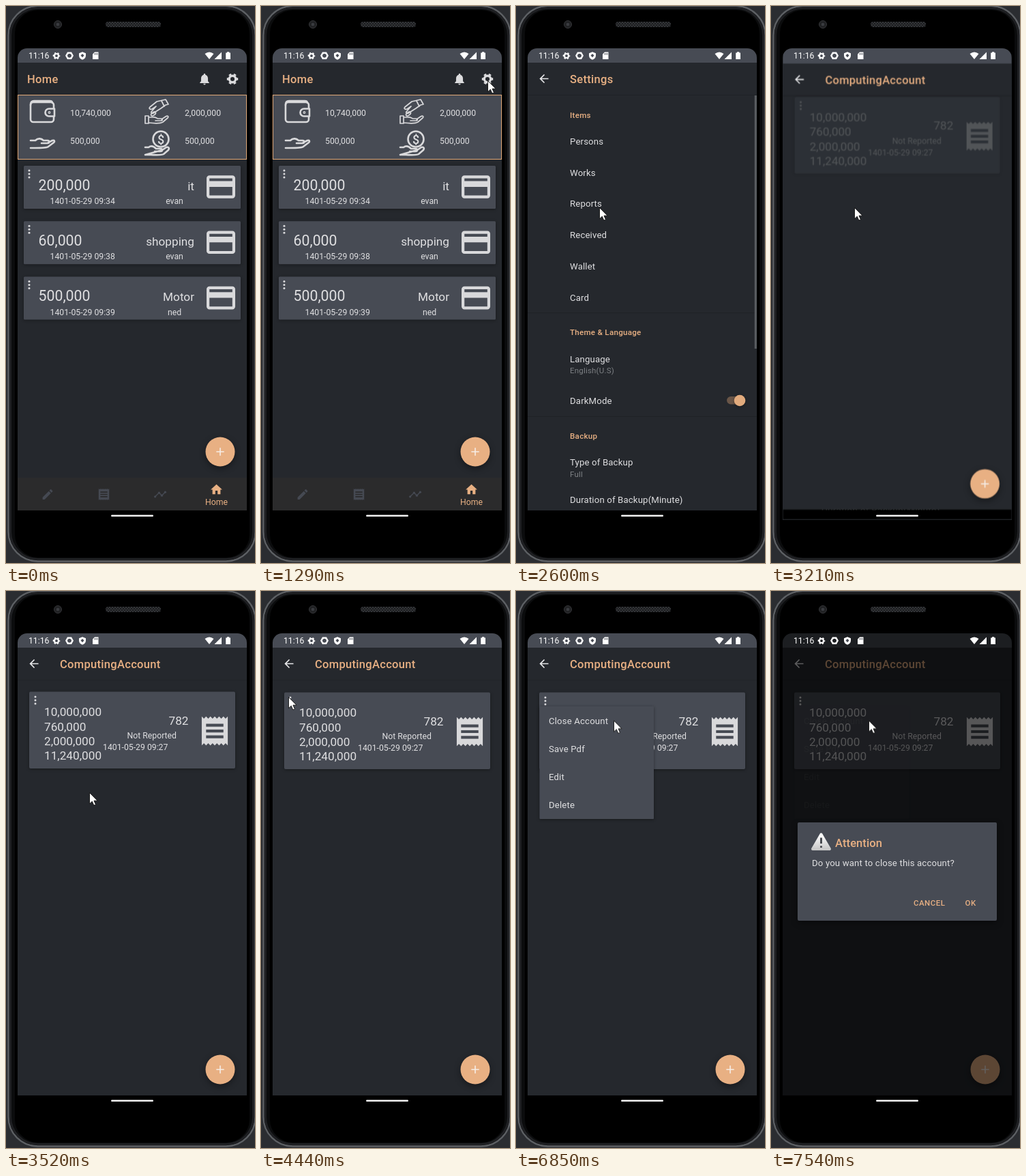
Recreate the animation shown at these times as an HTML page. Size 365 by 816 pixels, loop 8000 ms.

```html
<!DOCTYPE html>
<html lang="en">
<head>
<meta charset="utf-8">
<title>Account app walkthrough</title>
<style>
html, body { margin: 0; width: 100%; height: 100%; overflow: hidden; background: #2b2d31; }
svg { display: block; }
#stage { width: 365px; height: 816px; }
text { font-family: Roboto, "Noto Sans", sans-serif; fill: #dfdfe1; font-size: 12.26px; white-space: pre; }
.title { font-size: 16.5px; font-weight: 500; fill: #e8b083; letter-spacing: .3px; }
#dialog .title { letter-spacing: .1px; }
.head { font-size: 11.6px; font-weight: 500; fill: #e8b083; letter-spacing: .27px; }
.item { font-size: 13.2px; letter-spacing: .15px; }
.note { font-size: 11.5px; fill: #7d8084; letter-spacing: .2px; }
.sum { font-size: 21.3px; }
.mid { font-size: 17.2px; }
.btn { font-size: 11.44px; font-weight: 500; fill: #e8b083; letter-spacing: .5px; }
.end { text-anchor: end; }
.center { text-anchor: middle; }
.panel { fill: #474b54; filter: drop-shadow(0 1.5px 2px rgba(0,0,0,.38)); }
.high { filter: drop-shadow(0 3px 5px rgba(0,0,0,.4)); }
.line { fill: none; stroke: #d9d9db; stroke-width: 2.6; stroke-linecap: round; stroke-linejoin: round; }
.thin { stroke-width: 1.7; }
#home, #settings, #account, #dialog { transform-origin: 185px 407.5px; }
</style>
</head>
<body>
<svg id="stage" viewBox="0 0 365 816">
  <defs>
    <clipPath id="screen"><path d="M17 753V76a14 14 0 0 1 14-14H339a14 14 0 0 1 14 14V753z"/></clipPath>
    <pattern id="mesh" width="4" height="4" patternUnits="userSpaceOnUse">
      <path d="M0 0l4 4M4 0L0 4" stroke="#36383b" stroke-width=".9"/>
    </pattern>
    <linearGradient id="tin" x2="0" y2="1">
      <stop offset="0" stop-color="#fff"/><stop offset="1" stop-color="#c9c9c9"/>
    </linearGradient>
    <g id="gear">
      <circle r="5.6" fill="none" stroke="currentColor" stroke-width="4"/>
      <circle r="8.4" fill="none" stroke="currentColor" stroke-width="2.8" pathLength="12" stroke-dasharray="1" stroke-dashoffset=".5"/>
    </g>
    <g id="dots" fill="#dcdcde"><circle cy="-5" r="1.5"/><circle r="1.5"/><circle cy="5" r="1.5"/></g>
    <path id="arrow" transform="scale(.82) translate(-12 -12)" fill="#e8e8ea" d="M20 11H7.83l5.59-5.59L12 4l-8 8 8 8 1.41-1.41L7.83 13H20z"/>
    <path id="receipt" transform="translate(-12 -12)" d="M18 17H6v-2h12zm0-4H6v-2h12zm0-4H6V7h12zM3 22l1.5-1.5L6 22l1.5-1.5L9 22l1.5-1.5L12 22l1.5-1.5L15 22l1.5-1.5L18 22l1.5-1.5L21 22V2l-1.5 1.5L18 2l-1.5 1.5L15 2l-1.5 1.5L12 2l-1.5 1.5L9 2 7.5 3.5 6 2 4.5 3.5 3 2z"/>
    <path id="bank" transform="translate(-12 -12)" fill="#d9d9db" d="M20 4H4a2 2 0 0 0-2 2v12a2 2 0 0 0 2 2h16a2 2 0 0 0 2-2V6a2 2 0 0 0-2-2zm0 14H4v-6h16zm0-10H4V6h16z"/>
    <g id="fab">
      <circle class="high" r="21.5" fill="#e8b083"/>
      <path d="M-5.7 0H5.7M0-5.7V5.7" stroke="#f6ede6" stroke-width="1.6"/>
    </g>
    <g id="window">
      <path fill="#25282d" d="M17 62h336v677H17z"/>
      <path fill="#474b54" d="M17 62h336v21H17z"/>
      <path d="M17 739h336v14H17z"/>
    </g>
  </defs>

  <rect width="365" height="816" fill="#2b2d31"/>
  <rect x="3.5" y="0" width="362" height="813.5" rx="43" fill="#0b0c0d" stroke="#5d6064" stroke-width="2.4"/>
  <rect x="6.5" y="3" width="356" height="807.5" rx="40" fill="none" stroke="#1f2023" stroke-width="3"/>
  <rect x="13" y="6" width="344" height="802" rx="34"/>
  <circle cx="76" cy="27" r="5.5" fill="#202123" stroke="#343538"/>
  <circle cx="76" cy="27" r="2.3" fill="#3a3c40"/>
  <rect x="146" y="23" width="81" height="8" rx="4" fill="#1b1c1e"/>
  <rect x="146" y="23" width="81" height="8" rx="4" fill="url(#mesh)"/>

  <g clip-path="url(#screen)">
    <rect x="17" y="62" width="336" height="691"/>
    <g id="home">
      <use href="#window"/>
      <text class="title" x="31" y="113">Home</text>
      <path transform="translate(291 107) scale(.84) translate(-12 -12)" fill="#dcdcde" d="M12 22a2 2 0 0 0 2-2h-4a2 2 0 0 0 2 2zm6-6v-5c0-3-1.6-5.6-4.5-6.3V4a1.5 1.5 0 0 0-3 0v.7C7.6 5.4 6 8 6 11v5l-2 2v1h16v-1z"/>
      <use href="#gear" color="#dcdcde" transform="translate(332 107) scale(.84)"/>
      <rect x="17.5" y="130.5" width="335" height="94" fill="#474b54" stroke="#e0a878"/>
      <g class="line">
        <rect x="36" y="141" width="34" height="29" rx="4"/>
        <path d="M36 145c0-5 2-6 5-6h23c3 0 4 1 4 3"/>
        <path d="M71 150.5H63a5 5 0 0 0 0 11h8z" fill="#474b54"/>
        <circle cx="63.5" cy="156" r=".6"/>
        <path d="M36 197h7c4-4 9-3 12 0h6c3 0 3 4 0 4h-9M62 200l6-3c3-1 4 1 2 3l-8 6c-2 2-18 2-20 2h-6"/>
      </g>
      <g class="line thin">
        <path d="M234 137l-13 3-10 8c-2 2 0 4 3 3l6-4-7 8c-1 2 1 3 3 2l11-7 7-5 4-1zM228 139l4 8"/>
        <path d="M204 161h5v11h-5zM209 163h6c4-1 5 1 8 2h4c3 0 3 3 0 3h-8M228 166l6-4c3-2 5 0 3 2l-7 6c-3 2-13 2-21 1"/>
        <ellipse cx="216" cy="158" rx="4" ry="2.2" transform="rotate(-40 216 158)"/>
      </g>
      <g class="line">
        <circle cx="227" cy="195" r="11.5"/>
        <path d="M204 207h5c4-3 8-1 11 2h6c4 0 4 4 0 4h-8M229 211l6-4c3-1 5 1 3 4l-7 6c-3 2-14 1-19 1h-8z"/>
      </g>
      <text class="center" x="227" y="201.5" style="font-size:18px;font-weight:500">$</text>
      <text x="94" y="161">10,740,000</text><text x="262" y="161">2,000,000</text>
      <text x="94" y="202">500,000</text><text x="262" y="202">500,000</text>
      <g id="cards"></g>
      <use href="#fab" x="314" y="653"/>
      <path fill="#2b2b2c" d="M17 691h336v48H17z"/>
      <g fill="#454952">
        <path transform="translate(61 715.5) scale(.82) translate(-12 -12)" d="M3 17.25V21h3.75L17.8 9.9l-3.7-3.7zM20.7 7a1 1 0 0 0 0-1.4l-2.3-2.3a1 1 0 0 0-1.4 0l-1.9 1.8 3.75 3.75z"/>
        <use href="#receipt" transform="translate(143.5 715.5) scale(.86)"/>
        <g transform="translate(226 715.5) scale(.82) translate(-12 -12)">
          <path d="M3 16l7-7 5 5 6-6" fill="none" stroke="#454952" stroke-width="1.8"/>
          <circle cx="3" cy="16" r="2"/><circle cx="10" cy="9" r="2"/><circle cx="15" cy="14" r="2"/><circle cx="21" cy="8" r="2"/>
        </g>
      </g>
      <path transform="translate(308.5 708) scale(.84) translate(-12 -11.5)" fill="#e8b083" d="M10 20v-6h4v6h5v-8h3L12 3 2 12h3v8z"/>
      <text class="center" x="308.5" y="731" style="fill:#e8b083">Home</text>
    </g>

    <g id="settings">
      <use href="#window"/>
      <use href="#arrow" x="41" y="106.5"/>
      <text class="title" x="79" y="113">Settings</text>
      <path d="M17 130.5h336M17 449.5h336M17 601.5h336" stroke="#1f2226"/>
      <g id="prefs"></g>
      <path d="M351.3 131V502" stroke="#595c60" stroke-width="3.2"/>
      <rect x="309" y="572" width="26" height="11.5" rx="5.75" fill="#6a5648"/>
      <circle class="panel" cx="328" cy="578" r="8.3" style="fill:#e2ab7d"/>
    </g>

    <g id="account">
      <use href="#window"/>
      <use href="#arrow" x="41" y="106.5"/>
      <text class="title" x="79" y="113">ComputingAccount</text>
      <path d="M17 130.5h336" stroke="#212428"/>
      <g id="entry">
        <rect class="panel" x="34" y="148.5" width="302" height="112.5" rx="2"/>
        <use href="#dots" x="43" y="161"/>
        <g id="totals"></g>
        <text class="mid end" x="267.5" y="196.5">782</text>
        <text class="end" x="250" y="217">Not Reported</text>
        <text x="142" y="234">1401-05-29 09:27</text>
        <use href="#receipt" fill="#d9d9db" transform="translate(306 206) scale(2.12)"/>
      </g>
      <use href="#fab" x="314" y="701"/>
      <g id="menu">
        <rect class="panel" x="34.5" y="169" width="167.5" height="165" rx="1"/>
        <g id="choices"></g>
      </g>
    </g>

    <rect id="dim" x="17" y="62" width="336" height="677"/>
    <g id="dialog">
      <rect class="panel high" x="39" y="339" width="292" height="144" rx="2"/>
      <path d="M73.5 356.5L86 378H61z" fill="url(#tin)" stroke="url(#tin)" stroke-width="4" stroke-linejoin="round"/>
      <path d="M73.5 361.5v8.5M73.5 373.5v2.5" stroke="#3f4248" stroke-width="2.8"/>
      <text class="title" x="94" y="375">Attention</text>
      <text class="item" x="60" y="403">Do you want to close this account?</text>
      <text class="btn" x="209" y="461">CANCEL</text>
      <text class="btn" x="284.5" y="461">OK</text>
    </g>

    <g fill="#fff" color="#fff">
      <text x="33" y="77" style="fill:#fff;font-size:12.2px">11:16</text>
      <use href="#gear" transform="translate(74 73) scale(.54)"/>
      <path fill-rule="evenodd" d="M90 67.5h6l3 5.2-3 5.3h-6l-3-5.3zM93 69.8a3 3 0 1 0 .01 0z"/>
      <path d="M112 67.2l5 2v3.5c0 3-2 5-5 6-3-1-5-3-5-6v-3.5z"/>
      <path d="M112 70l2.5 2.6-2.5 2.6-2.5-2.6z" fill="#474b54"/>
      <path d="M130 67.5h5.5v10.5H127v-7.5z"/>
      <path d="M130 69v2.5M132 69v2.5M134 69v2.5" stroke="#474b54" stroke-width=".9"/>
      <path d="M291.5 70q6.5-5 13 0l-6.5 8z"/>
      <path d="M316 67.5V78h-10.5z"/>
      <path d="M324 68.5v-1.2h3.2v1.2h1.8V78h-6.8v-9.5z"/>
    </g>
    <rect x="154" y="745.5" width="62" height="2.5" rx="1.25" fill="#f2f2f2"/>
  </g>

  <g id="cursor">
    <circle id="tap" r="15" fill="#ff0" fill-opacity=".47"/>
    <path d="M.5.5v16.3l3.8-3.6 2.5 5.8 2.7-1.1L7 12.2h5z" fill="#fff" stroke="#111" stroke-width=".9"/>
  </g>
</svg>
<script>
const LOOP = 8000, START = 130, STEP = 77, LEAD = 10;
const el = id => document.getElementById(id);
const label = (x, y, str, cls = '') => `<text x="${x}" y="${y}" class="${cls}">${str}</text>`;

el('cards').innerHTML = [
  ['200,000', 'it', 'evan', '34'],
  ['60,000', 'shopping', 'evan', '38'],
  ['500,000', 'Motor', 'ned', '39']
].map(([sum, work, who, min], i) => `<g transform="translate(0 ${i * 81.3})">
  <rect class="panel" x="26" y="234" width="318" height="63" rx="1.5"/>
  <use href="#dots" x="34" y="246"/>
  ${label(47.5, 269.5, sum, 'sum')}${label(276, 269.5, work, 'mid end')}
  ${label(64.5, 290, '1401-05-29 09:' + min)}${label(247, 290, who, 'center')}
  <use href="#bank" transform="translate(315 265) scale(2.1)"/></g>`).join('');

el('prefs').innerHTML = [
  ['Items', 164.2, 'head'],
  ...['Persons', 'Works', 'Reports', 'Received', 'Wallet', 'Card'].map((s, i) => [s, 202.8 + i * 45.75, 'item']),
  ['Theme &amp; Language', 482.2, 'head'], ['Language', 521.5, 'item'], ['English(U.S)', 538, 'note'],
  ['DarkMode', 583.3, 'item'], ['Backup', 634.2, 'head'], ['Type of Backup', 673, 'item'],
  ['Full', 690, 'note'], ['Duration of Backup(Minute)', 728, 'item']
].map(([s, y, cls]) => label(79, y, s, cls)).join('');

el('totals').innerHTML = ['10,000,000', '760,000', '2,000,000', '11,240,000']
  .map((s, i) => label(56, 184.2 + i * 21.4, s, 'mid')).join('');
el('choices').innerHTML = ['Close Account', 'Save Pdf', 'Edit', 'Delete']
  .map((s, i) => label(48, 195 + i * 41.1, s, 'item')).join('');

// Rows are [time, css]; the ends are padded to fill the loop.
const tracks = [];
function track(id, rows, easing = 'linear') {
  const all = [[0, rows[0][1]], ...rows, [LOOP, rows[rows.length - 1][1]]];
  const frames = all.map(([t, css]) => ({ ...css, easing, offset: t / LOOP }));
  const anim = el(id).animate(frames, { duration: LOOP, fill: 'both' });
  anim.pause();
  tracks.push(anim);
}
const fade = (id, rows, easing) => track(id, rows.map(([t, opacity]) => [t, { opacity }]), easing);
const scale = (id, rows) => track(id, rows.map(([t, s]) => [t, { transform: `scale(${s})` }]), 'cubic-bezier(.05,.7,.1,1)');
const HOLD = 'steps(1, end)';

scale('home', [[1580, 1], [1980, 1.05]]);
fade('settings', [[1620, 0], [1700, 1]]);
scale('settings', [[1580, .85], [1980, 1], [2960, 1], [3360, 1.05]]);
fade('account', [[3000, 0], [3080, 1]]);
scale('account', [[2960, .85], [3360, 1]]);
fade('entry', [[3130, 0], [3450, 1]]);
track('entry', [
  [3130, { transform: 'translateY(-22px)' }],
  [3595, { transform: 'translateY(0px)' }]
], 'ease-out');

fade('menu', [[4540, 0], [4780, 1], [7300, 1], [7520, .1]]);
track('menu', [
  [4540, { transform: 'translateY(-15px)', clipPath: 'inset(0 60% 80% 0)' }],
  [4820, { transform: 'translateY(0px)', clipPath: 'inset(-8px)' }]
], 'ease-out');
fade('dim', [[7300, 0], [7520, .6]]);
fade('dialog', [[7340, 0], [7500, 1]]);
scale('dialog', [[7340, .95], [7520, 1]]);

track('cursor', [
  [130, 268, 659], [207, 259, 499], [361, 259, 499], [800, 296, 270], [1131, 330, 114], [1208, 332, 109],
  [1430, 332, 109], [1747, 318, 126], [2209, 187, 250], [2594, 122, 295], [3518, 122, 295],
  [3595, 108, 241], [3980, 43, 151], [4130, 40, 155], [4985, 40, 155], [5289, 107, 222],
  [5443, 118, 233], [5828, 134, 193], [6060, 143, 189.5]
].map(([t, x, y]) => [t, { transform: `translate(${x}px, ${y}px)` }]));
fade('cursor', [[0, 0], [129, 1]], HOLD);
fade('tap', [[0, 0], ...[1208, 2825, 4365, 6752].flatMap(t => [[t - 1, 1], [t + 76, 0]])], HOLD);

// The picture advances in even steps, as a screen recording does.
const begin = performance.now();
function draw() {
  const t = (performance.now() - begin) % LOOP;
  const at = Math.max(0, START + Math.floor((t - START + LEAD) / STEP) * STEP);
  for (const anim of tracks) anim.currentTime = Math.min(at, LOOP - 1);
  requestAnimationFrame(draw);
}
draw();
</script>
</body>
</html>
```
